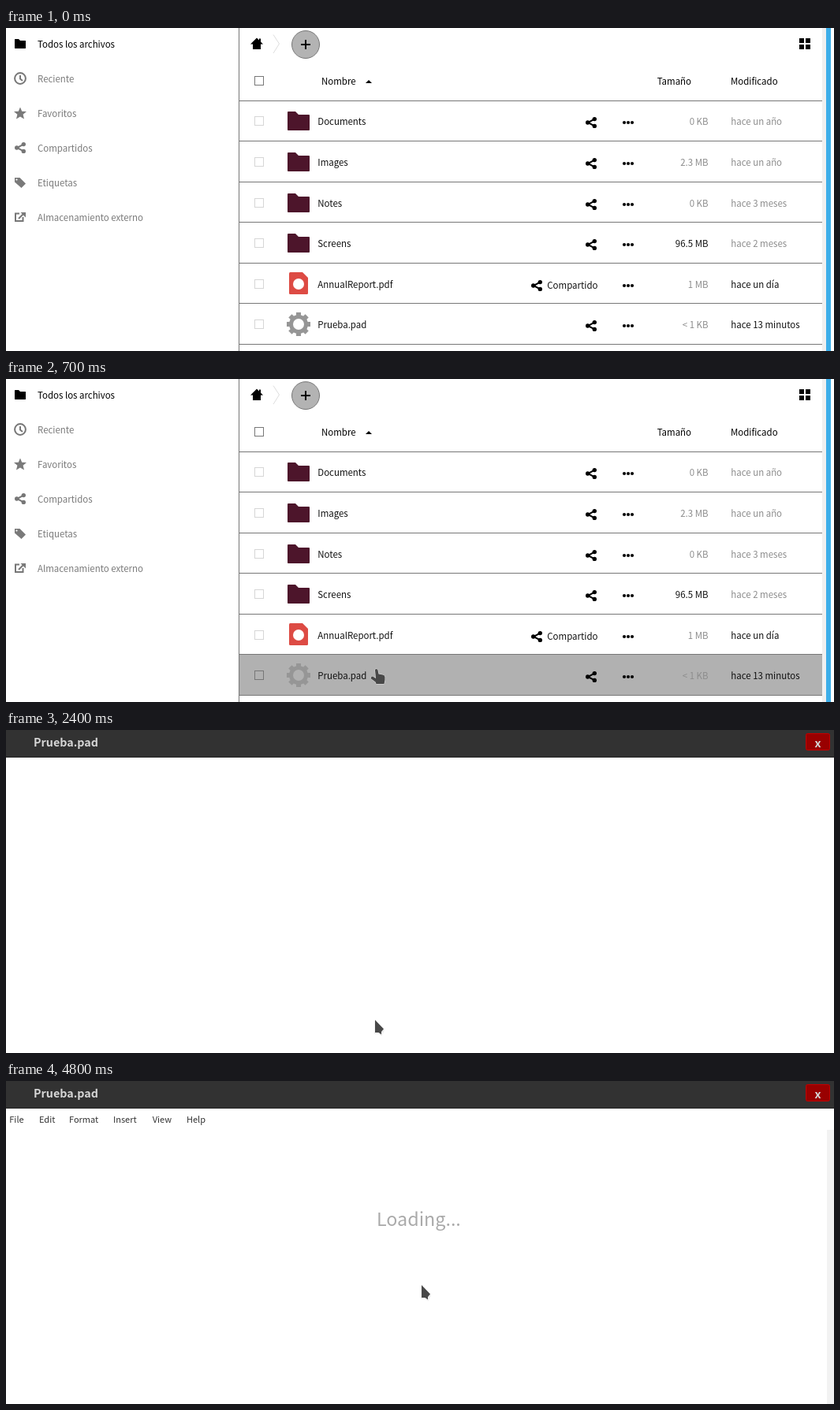
Write an HTML page that moves like this. It is 1050 by 410 pixels and loops after 8 s.

```html
<!DOCTYPE html>
<html lang="es">
<head>
<meta charset="utf-8">
<style>
html, body { margin: 0; width: 100%; height: 100%; overflow: hidden; background: #fff; }
svg { display: block; width: 1050px; height: 410px; }
text { font: 11.46px "Noto Sans CJK SC", "Noto Sans CJK JP", "Noto Sans CJK", "Open Sans", sans-serif; white-space: pre; }
.end { text-anchor: end; }
.menu { font-size: 11px; fill: #333; }
.bold { font-size: 14.3px; font-weight: 700; fill: #d6d6d6; }
.loading { font-size: 23.3px; fill: #aaa; }
.grey { fill: #7a7a7a; stroke: none; }
.box { fill: none; stroke: #777; }
.pale { stroke: #d6d6d6; }
</style>
</head>
<body>
<svg viewBox="0 0 1050 410">
  <defs>
    <path id="folder" d="M1.5 2c-.25 0-.5.25-.5.5v11c0 .26.24.5.5.5h13c.26 0 .5-.24.5-.5v-9c0-.25-.25-.5-.5-.5H8L6 2z"/>
    <g id="share">
      <path d="M12.3 3.6 4 8l8.3 4.4" fill="none" stroke="currentColor" stroke-width="2"/>
      <g fill="currentColor"><circle cx="3.7" cy="8" r="2.7"/><circle cx="12.3" cy="3.6" r="2.7"/><circle cx="12.3" cy="12.4" r="2.7"/></g>
    </g>
    <g id="dots"><circle cx="-5" r="2.1"/><circle r="2.1"/><circle cx="5" r="2.1"/></g>
    <path id="home" d="M18 12.5 10 20.5h3V27h10v-6.5h3l-3-3V13.5h-2v2z"/>
    <path id="crumb" d="M39 8.5 46.5 20 39 32" fill="none" stroke="#ddd"/>
    <path id="grid" d="M0 13h6v6h-6zM8 13h6v6h-6zM0 21h6v6h-6zM8 21h6v6h-6z"/>
  </defs>

  <g id="files">
    <use href="#folder" x="10" y="12"/>
    <text x="40" y="25">Todos los archivos</text>
    <g fill="none" stroke="#777" stroke-width="2">
      <circle cx="18" cy="64" r="6.9"/><path d="M18 60v4.5l3 2.5"/>
      <path d="M17 235.5h-5v9.5h9.5v-5"/><path d="M16 242l6-6"/>
    </g>
    <path class="grey" d="M18.5 234H25v6.5zM11 190h6.5l7.5 7.5-5.5 5.5-8.500-7.500zM18 100.500l2.200 5.200 5.800.4-4.400 3.700 1.400 5.700-5-3.100-5 3.100 1.400-5.700-4.400-3.700 5.800-.4z"/>
    <circle cx="13.500" cy="192.500" r="1.100" fill="#fff"/>
    <use href="#share" x="10" y="144" color="#777"/>
    <g id="side"></g>

    <path d="M295.500 0V410" stroke="#777"/>
    <rect x="1035" width="5" height="410" fill="#f0f0f0"/>
    <rect x="1040" width="6" height="410" fill="#3daee9"/>
    <use href="#home" x="300"/><use href="#crumb" x="300"/><use href="#grid" x="1006"/>
    <circle cx="380" cy="21" r="17.500" fill="#b3b3b3" stroke="#777"/>
    <path d="M374 21h12M380 15v12" stroke="#000" stroke-width="2"/>
    <rect class="box" x="315.500" y="61.500" width="11" height="11"/>
    <text x="400" y="72">Nombre</text><path d="M456 70h8l-4-4z"/>
    <text x="825.700" y="72">Tamaño</text><text x="919" y="72">Modificado</text>
    <rect id="hover" x="296" y="350" width="739" height="51"/>
    <g id="rows"></g>
    <path id="pdf" d="M360.500 310H376l7 7v19.500a1.500 1.500 0 0 1-1.500 1.500h-21a1.500 1.500 0 0 1-1.500-1.500v-25a1.500 1.500 0 0 1 1.500-1.500z" fill="#dd4b44"/>
    <circle cx="371" cy="325" r="7" fill="#fff"/>
    <g transform="translate(371 376)" fill="none" stroke="#969696">
      <circle r="9.500" stroke-width="5"/><g id="teeth" stroke-width="6"></g>
    </g>
  </g>

  <g id="blank">
    <use href="#home"/><use href="#crumb"/><use href="#grid" x="1022"/>
  </g>

  <g id="pad">
    <rect width="1050" height="35" fill="#323232"/><rect y="34" width="1050" height="1" fill="#222"/>
    <text class="bold" x="35" y="21">Prueba.pad</text>
    <rect x="1014.500" y="4.500" width="30" height="21" rx="2" fill="#900" stroke="#c00000"/>
    <text class="bold" x="1029.500" y="22" text-anchor="middle">x</text>
  </g>

  <g id="editor">
    <g id="menu"></g>
    <rect x="1041" y="62" width="9" height="348" fill="#f2f2f2"/>
    <text class="loading" x="470" y="184">Loading...</text>
  </g>

  <g id="hand">
    <path d="M6 2.500Q6 1 7.500 1T9.500 2.500L10.500 7.500 16 8.500Q18.500 9 18.500 11.500V15L17.500 20H7.500L6.500 17.500 1 13.500Q0 12 1.500 11T4.500 11.500L7 13z" fill="#484848" stroke="#fff" stroke-opacity=".7" paint-order="stroke"/>
  </g>
  <g id="arrow">
    <path d="M-1 1V17.500H4L8.500 20.500 12 13z" fill="#000" opacity=".07"/>
    <path d="M0 0V16H4.500L8 18.500V15L11 11.500z" fill="#484848" stroke="#fff" stroke-opacity=".8" paint-order="stroke"/>
  </g>
</svg>
<script>
const $ = id => document.getElementById(id);
const text = (x, y, s, cls = '', fill = '') =>
  `<text x="${x}" y="${y}" class="${cls}" ${fill && `style="fill:${fill}"`}>${s}</text>`;

$('side').innerHTML = ['Reciente', 'Favoritos', 'Compartidos', 'Etiquetas', 'Almacenamiento externo']
  .map((s, i) => text(40, 69 + 44 * i, s, 'grey')).join('');

const dim = '#8c8c8c', ink = '#111';
const rows = [
  ['Documents', '0 KB', 'hace un año'],
  ['Images', '2.3 MB', 'hace un año'],
  ['Notes', '0 KB', 'hace 3 meses'],
  ['Screens', '96.5 MB', 'hace 2 meses'],
  ['AnnualReport.pdf', '1 MB', 'hace un día'],
  ['Prueba.pad', '&lt; 1 KB', 'hace 13 minutos']
];
const line = i => `<path d="M296 ${Math.floor(92 + 51.5 * i) + .5}H1035" stroke="#777"/>`;
$('rows').innerHTML = line(0) + rows.map(([name, size, date], i) => {
  const y = Math.round(118.4 + 51.6 * i), shared = i == 4;
  return line(i + 1) +
    `<rect class="box pale" x="315.5" y="${y - 5.5}" width="11" height="11"/>` +
    (i < 4 ? `<use href="#folder" transform="translate(355 ${y - 16}) scale(2)" fill="#4d152b"/>` : '') +
    text(395.3, y + 5, name, '', ink) +
    `<use href="#share" x="${shared ? 665 : 734}" y="${y - 6}"/>` +
    (shared ? text(686.3, y + 6, 'Compartido', '', ink) : '') +
    `<use href="#dots" x="789" y="${y + 2}"/>` +
    text(890.5, y + 5, size, 'end', i == 3 ? ink : dim) +
    text(919.3, y + 5, date, '', i > 3 ? ink : dim);
}).join('');

$('teeth').innerHTML = [...Array(8)].map((_, i) =>
  `<path d="M0 -10V-15" transform="rotate(${45 * i})"/>`).join('');

const menu = { File: 4.3, Edit: 42, Format: 80, Insert: 136, View: 185.7, Help: 229 };
$('menu').innerHTML = Object.entries(menu).map(([s, x]) => text(x, 53, s, 'menu')).join('');

const lastBox = [...document.querySelectorAll('.pale')].pop();
const show = (id, on) => $(id).style.display = on ? '' : 'none';
const place = (id, x, y) => $(id).setAttribute('transform', `translate(${x} ${y})`);
// Value of the latest [time, value] step already reached
const at = (t, steps) => steps.filter(s => s[0] <= t).pop()[1];

function draw(now) {
  const t = now % 8000;
  show('files', t < 1600);
  show('blank', t >= 1600 && t < 2400);
  show('pad', t >= 2400);
  show('editor', t >= 3400);
  show('hand', t >= 500 && t < 1600);
  show('arrow', t >= 1600);
  $('hover').style.fill = at(t, [[0, '#fff'], [500, '#eee'], [600, '#cfcfcf'], [700, '#b1b1b1']]);
  lastBox.style.stroke = t < 600 ? '' : '#777';
  place('hand', t < 1100 ? 462 : 461, 367);
  place('arrow', ...at(t, [[0, [468, 368]], [4400, [476, 349]], [4500, [491, 314]], [4600, [505, 281]], [4800, [527, 259]]]));
  requestAnimationFrame(draw);
}
draw(0);
</script>
</body>
</html>
```
